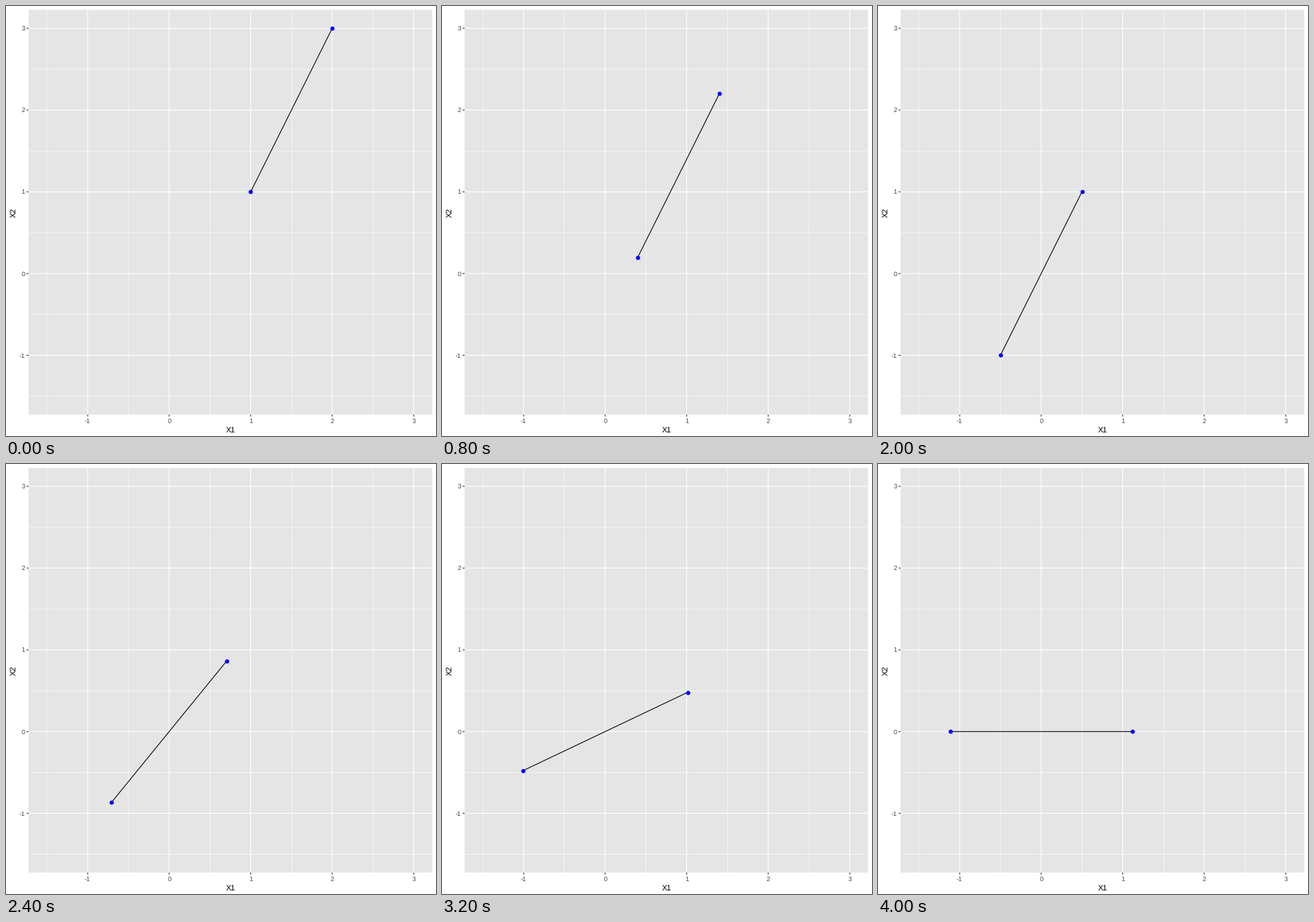
These frames come from a looping animation (600 px wide and 600 px high, 4200 ms). A matplotlib script:

```python
import math

import matplotlib.pyplot as plt
from matplotlib.animation import FuncAnimation
from matplotlib.patches import Rectangle

plt.rcParams.update({
    "font.family": "Liberation Sans",
    "text.hinting": "none",
    "text.hinting_factor": 1,
    "path.snap": False,
    "toolbar": "None",
})

SIZE = 600
LEFT, RIGHT, TOP, BOTTOM = 31.5, 594.5, 5.5, 570.1
LOW, HIGH = -1.725, 3.225
SHIFT_STEPS, TURN_STEPS = 10, 10

# At 72 dpi one point is one pixel.
fig = plt.figure(figsize=(SIZE / 72, SIZE / 72), dpi=72, facecolor="white")
ax = fig.add_axes([0, 0, 1, 1])
ax.set_xlim(0, SIZE)
ax.set_ylim(SIZE, 0)
ax.axis("off")


def px(x):
    return LEFT + (x - LOW) / (HIGH - LOW) * (RIGHT - LEFT)


def py(y):
    return BOTTOM - (y - LOW) / (HIGH - LOW) * (BOTTOM - TOP)


def stroke(xs, ys, color, width, z):
    return ax.plot(xs, ys, color=color, lw=width, zorder=z,
                   solid_capstyle="butt", snap=False)[0]


def label(x, y, text, size, color, ha="center", rotation=0):
    ax.text(x, y, text, fontsize=size, color=color, ha=ha, va="baseline",
            rotation=rotation, rotation_mode="anchor")


def grid(value, width, z):
    stroke([px(value)] * 2, [TOP, BOTTOM], "white", width, z)
    stroke([LEFT, RIGHT], [py(value)] * 2, "white", width, z)


ax.add_patch(Rectangle((LEFT, TOP), RIGHT - LEFT, BOTTOM - TOP,
                       fc="#E5E5E5", ec="none", zorder=0, snap=False))
for i in range(5):
    grid(i - 1.5, 0.55, 1)
for v in range(-1, 4):
    grid(v, 1.07, 2)
    stroke([px(v)] * 2, [BOTTOM, BOTTOM + 2.75], "#333333", 1.07, 3)
    stroke([LEFT - 2.75, LEFT], [py(v)] * 2, "#333333", 1.07, 3)
    label(px(v), 582.1, str(v), 8.8, "#444444")
    label(26.6, py(v) + 3.2, str(v), 8.8, "#444444", ha="right")
label((LEFT + RIGHT) / 2, 594.6, "X1", 11, "black")
label(13.4, (TOP + BOTTOM) / 2, "X2", 11, "black", rotation=90)

segment = stroke([], [], "black", 1.07, 4)
dots, = ax.plot([], [], "o", color="blue", ms=5.9, mew=0, zorder=5, snap=False)


def endpoints(step):
    """Slide the segment onto the origin, then turn it flat."""
    if step <= SHIFT_STEPS:
        dx, dy = 0.15 * step, 0.2 * step
        return [(1 - dx, 1 - dy), (2 - dx, 3 - dy)]
    left = 1 - (step - SHIFT_STEPS) / TURN_STEPS
    angle = math.atan2(1, 0.5) * left
    radius = math.hypot(1, 0.5)
    x, y = radius * math.cos(angle), radius * math.sin(angle)
    return [(-x, -y), (x, y)]


def update(step):
    points = endpoints(step)
    xs = [px(x) for x, _ in points]
    ys = [py(y) for _, y in points]
    segment.set_data(xs, ys)
    dots.set_data(xs, ys)
    return segment, dots


anim = FuncAnimation(fig, update, frames=SHIFT_STEPS + TURN_STEPS + 1,
                     interval=200, repeat=True, repeat_delay=0, blit=False)
plt.show()
```
